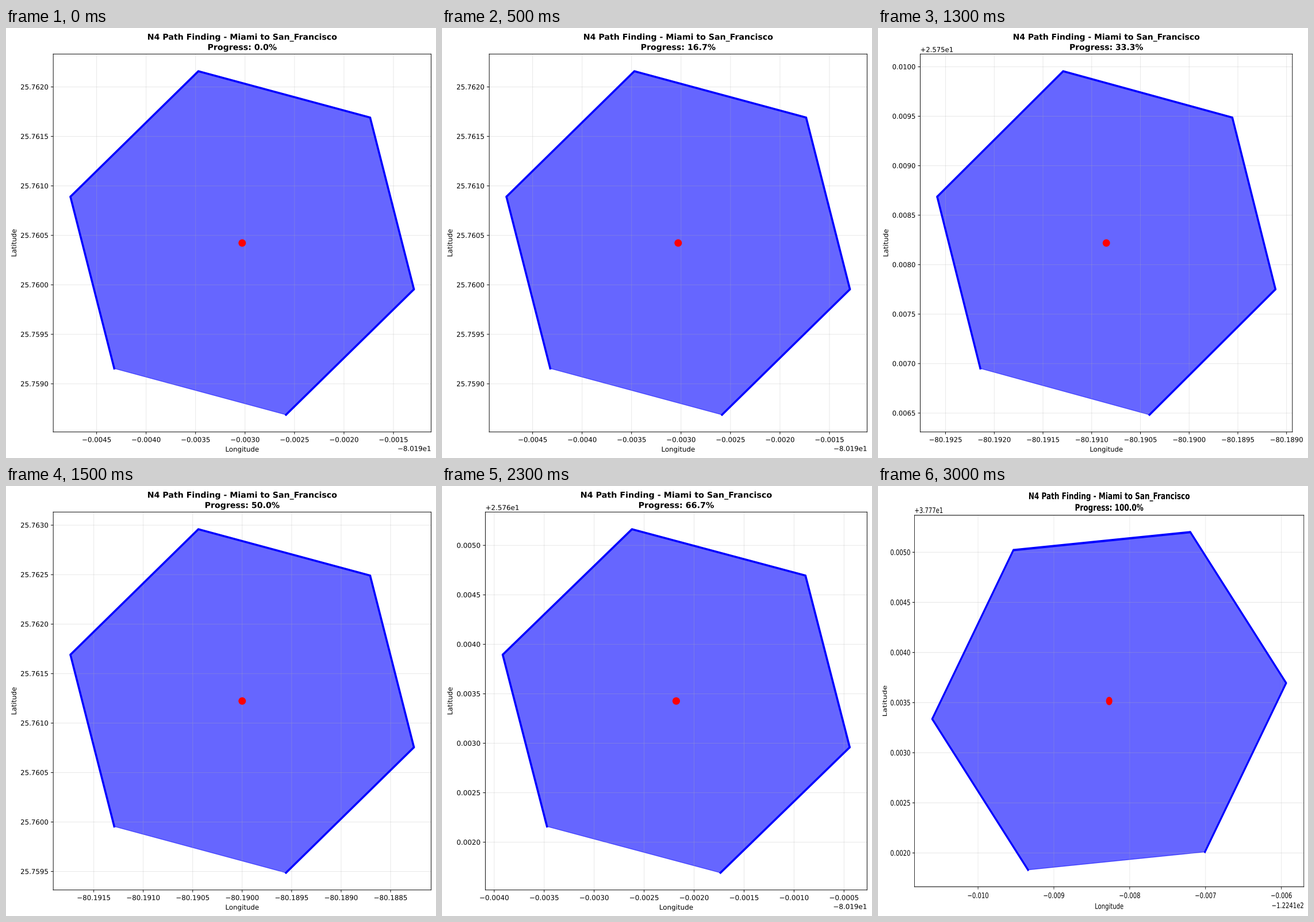
Write a matplotlib script that moves like this. It is 748x748 px and loops after 3500 ms.

```python
import numpy as np
import matplotlib.pyplot as plt
from matplotlib.animation import FuncAnimation
from matplotlib.patches import Circle, PathPatch, Polygon
from matplotlib.textpath import TextPath
from matplotlib.transforms import Affine2D

STAGE = 748
DPI = 85
STEPS = 7

# Each chart is laid out at 100 dpi, then fitted to the square stage.
PT = 100 / 72
PAD = 10
EDGE = 53.3             # room above and below the plot
TICK = 3.5 * PT
GAP = 7 * PT            # from the plot to its tick labels
ASCENT, LINE = 11, 14   # label text height above the baseline and in full
HAIR = 0.8 * PT

# Cell grids: base (lon, lat), first centre, two steps to neighbours,
# pixels per degree and tick spacing.
EAST = dict(base=(-80.19, 25.76), start=(-0.003029, 0.000423),
            a=(0.003029, 0.000800), b=(0.000850, 0.003004),
            scale=202540, ticks=(0.0005, 0.0005))
WEST = dict(base=(-122.41, 37.77), start=(-0.008271, 0.003516),
            a=(0.003404, 0.001864), b=(-0.000193, 0.003190),
            scale=182570, ticks=(0.001, 0.0005))

# Grid, cell (i, j), and the offsets taken off the lon and lat labels.
ROUTE = [
    (EAST, (0, 0), -80.19, 0),
    (EAST, (0, 0), -80.19, 0),
    (EAST, (1, -1), 0, 25.75),
    (EAST, (1, 0), 0, 0),
    (EAST, (0, 1), -80.19, 25.76),
    (EAST, (-1, 1), -80.19, 25.76),
    (WEST, (0, 0), -122.41, 37.77),
]

fig = plt.figure(figsize=(STAGE / DPI, STAGE / DPI), dpi=DPI, facecolor="white")
ax = fig.add_axes([0, 0, 1, 1])


def outline(s, size, weight="normal"):
    return TextPath((0, 0), s, size=size,
                    prop={"family": "DejaVu Sans", "weight": weight})


def advance(s, size, weight="normal"):
    full = outline(s + "0", size, weight).get_extents().x1
    return full - outline("0", size, weight).get_extents().x1


def text(x, y, s, align=0.5, points=10, weight="normal", angle=0):
    """Write s on its baseline; align is 0 left, 0.5 centre, 1 right."""
    size = points * PT
    place = Affine2D().translate(-align * advance(s, size, weight), 0)
    place.rotate_deg(angle).translate(x, y)
    path = place.transform_path(outline(s, size, weight))
    ax.add_patch(PathPatch(path, fc="black", lw=0, snap=False))


def shape(points, color, alpha=1):
    ax.add_patch(Polygon(points, closed=True, fc=color, alpha=alpha,
                         lw=0, snap=False))


def bar(p, q, width, color="black", alpha=1, head=0, tail=0):
    """A straight stroke, lengthened by head before p and tail after q."""
    p, q = np.array(p, float), np.array(q, float)
    along = (q - p) / np.hypot(*(q - p))
    side = np.array([-along[1], along[0]]) * width / 2
    p, q = p - along * head, q + along * tail
    shape([p + side, q + side, q - side, p - side], color, alpha)


def disc(p, radius, color):
    ax.add_patch(Circle(p, radius, fc=color, lw=0))


def hexagon(a, b):
    half = np.array([a + b, 2 * a - b, a - 2 * b]) / 3
    lower_left, left, upper_left = -half
    return np.array([lower_left, left, upper_left, *half])


def tick_values(middle, reach, step):
    first = np.ceil((middle - reach) / step)
    last = np.floor((middle + reach) / step)
    return np.arange(first, last + 1) * step


def number(v, step):
    digits = 4 if step < 0.001 else 3
    return f"{v:.{digits}f}".replace("-", "−")


def offset_label(v):
    mantissa, power = f"{v:+.6e}".split("e")
    return f"{mantissa.rstrip('0')}e{int(power)}".replace("-", "−")


def draw(k):
    grid, (i, j), lon_offset, lat_offset = ROUTE[k]
    a, b = np.array(grid["a"]), np.array(grid["b"])
    middle = np.array(grid["start"]) + i * a + j * b
    cell = hexagon(a, b)
    reach = 1.1 * np.abs(cell).max(axis=0)
    scale = grid["scale"]
    wide, high = 2 * reach * scale

    offsets = (lon_offset, lat_offset)
    values = [tick_values(*args) for args in zip(middle, reach, grid["ticks"])]
    lon_labels, lat_labels = [
        [number(v + base - off, step) for v in vals]
        for vals, base, off, step in zip(values, grid["base"], offsets, grid["ticks"])
    ]

    # Layout
    size = 10 * PT
    label_width = max(advance(s, size) for s in lat_labels)
    left = PAD + LINE + 4 * PT + label_width + GAP
    right, bottom, top = left + wide, EDGE, EDGE + high
    centre = np.array([(left + right) / 2, (bottom + top) / 2])
    xs = centre[0] + (values[0] - middle[0]) * scale
    ys = centre[1] + (values[1] - middle[1]) * scale
    label_end = xs[-1] + advance(lon_labels[-1], size) / 2

    ax.clear()
    ax.axis("off")
    ax.set_xlim(0, max(right, label_end) + PAD)
    ax.set_ylim(0, top + EDGE)

    # Cell and grid lines
    corners = centre + cell * scale
    shape(corners, "blue", 0.6)
    bar(corners[-1], corners[0], PT, "blue", 0.6)
    for x in xs:
        bar((x, bottom), (x, top), HAIR, "#b0b0b0", 0.3)
    for y in ys:
        bar((left, y), (right, y), HAIR, "#b0b0b0", 0.3)

    # Border, open along the last side
    width = 3 * PT
    for n in range(5):
        bar(corners[n], corners[n + 1], width, "blue",
            head=width / 2 if n == 0 else 0, tail=width / 2 if n == 4 else 0)
    for p in corners[1:-1]:
        disc(p, width / 2, "blue")
    disc(centre, 5.5 * PT, "red")

    # Frame, ticks and labels
    for x in (left, right):
        bar((x, bottom), (x, top), HAIR, head=HAIR / 2, tail=HAIR / 2)
    for y in (bottom, top):
        bar((left, y), (right, y), HAIR, head=HAIR / 2, tail=HAIR / 2)
    for x, s in zip(xs, lon_labels):
        bar((x, bottom - TICK), (x, bottom), HAIR)
        text(x, bottom - GAP - ASCENT, s)
    for y, s in zip(ys, lat_labels):
        bar((left - TICK, y), (left, y), HAIR)
        text(left - GAP, y - 0.365 * size, s, align=1)
    if lon_offset:
        text(right, bottom - GAP - LINE - 3 * PT - ASCENT,
             offset_label(lon_offset), align=1)
    if lat_offset:
        text(left, top + 3 * PT, offset_label(lat_offset), align=0)
    text(centre[0], bottom - GAP - LINE - 4 * PT - ASCENT, "Longitude")
    text(PAD + ASCENT, centre[1], "Latitude", angle=90)

    title = top + 6 * PT
    progress = 100 * k / (STEPS - 1)
    text(centre[0], title + 21, "N4 Path Finding - Miami to San_Francisco",
         points=12, weight="bold")
    text(centre[0], title, f"Progress: {progress:.1f}%", points=12, weight="bold")
    return ax.patches


anim = FuncAnimation(fig, draw, frames=STEPS, interval=500, repeat=True)
plt.show()
```
